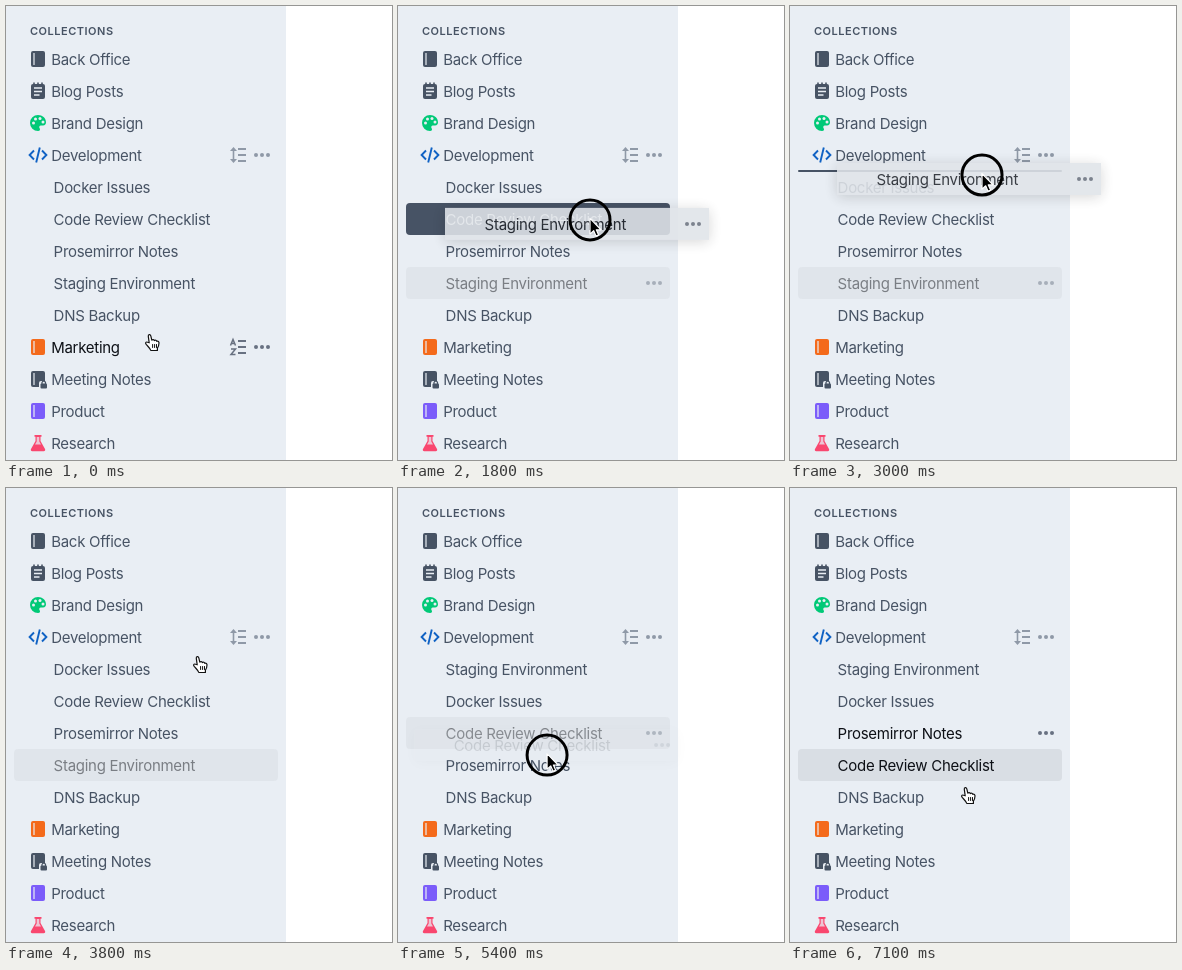
An HTML page that plays this animation: 386 px wide and 454 px high, repeating every 7760 ms.

```html
<!DOCTYPE html>
<html lang="en">
<head>
<meta charset="utf-8">
<title>Sidebar drag and drop</title>
<style>
  html, body { margin: 0; width: 100%; height: 100%; overflow: hidden; background: #fff; }
  svg { display: block; font: 15px Inter, "Open Sans", sans-serif; letter-spacing: -.28px; }
  text { fill: #475364; }
  .title { font-size: 11px; font-weight: 600; letter-spacing: .5px; }
  .ctl { color: #8f99a7; }
  .hover text { fill: #0d1016; }
  .hover .ctl { color: #687181; }
  .row .bg { fill: none; }
  .row .ctl { color: #687181; visibility: hidden; }
  .row.dots .ctl { visibility: visible; }
  .row.focus .bg { fill: #d9dee4; }
  .row.focus text { fill: #0d1016; }
  .row.dim { opacity: .5; }
  .row.drop .bg { fill: #475365; }
  .row.drop text { fill: #fff; }
  #ghost { filter: drop-shadow(0 2px 7px rgba(0, 0, 0, .18)); }
  #ghost .bg { fill: #e0e4e9; rx: 0; }
  #ghost text { fill: #22262d; }
  #ghost .ctl { color: #6b737f; }
</style>
</head>
<body>
<svg id="stage" width="386" height="454" viewBox="0 0 386 454">
  <rect width="280" height="454" fill="#e9eef4"/>
  <text class="title" x="24" y="29">COLLECTIONS</text>
  <g id="list"></g>
  <rect id="line" x="8" width="264" height="2" rx="1" fill="#475365"/>
  <g id="ghost"></g>
  <circle id="ring" fill="none" stroke="#000" stroke-width="3"/>
  <g id="arrow" stroke-linejoin="round">
    <path d="M0 -1.5V14.2L3.7 10.8 6 16.2 8.6 15.1 6.3 9.9H11Z" fill="#000" stroke="#fff" stroke-width="1.2"/>
  </g>
  <g id="hand" stroke="#111" stroke-linejoin="round" stroke-linecap="round">
    <path transform="translate(-6 -2)" fill="#fff" stroke-width="1.2" d="M5.2 9.8 4.3 3.4C4 1.2 6.3 .9 6.8 2.8L7.8 7.2C8.6 6.2 10 6.5 10.4 7.6 11.2 6.8 12.5 7.2 12.8 8.3 14 7.8 15.1 8.6 15 10 14.9 13 14.3 14 13.4 15.2V17.5H6.8C6.4 15.6 4 13.6 2.2 11.4 .8 9.6 2.2 8.5 3.6 9.3Z"/>
    <path transform="translate(-6 -2)" fill="none" stroke-width="1" d="M8.6 11.5v3M10.6 11.5v3M12.5 11.5v3"/>
  </g>
</svg>
<script>
const LOOP = 7760, TOP = 165, ROW = 32;
const INK = '#475364', PAPER = '#e9eef4';
const $ = id => document.getElementById(id);

// Icons are centred on their row.
const book = c => `<rect x="25" y="-8" width="14" height="16" rx="2" fill="${c}"/>
  <path d="M28 -6V6" stroke="${PAPER}" stroke-width="1.2"/>`;
const icons = {
  pad: `<rect x="25" y="-7" width="14" height="15" rx="2" fill="${INK}"/>
    <path d="M28 -8.5v3M32 -8.5v3M36 -8.5v3" stroke="${INK}" stroke-width="1.6"/>
    <path d="M28 -3h8M28 .5h8M28 4h5.5" stroke="${PAPER}" stroke-width="1.5"/>`,
  palette: `<path d="M32 -8a8 8 0 1 0 0 16c2.2 0 2.4-1.8 1.6-2.8-.9-1.2-.2-2.7 1.3-2.7H37c2 0 3-1.4 3-3.2C40 -5 36.4 -8 32 -8Z" fill="#00c977"/>
    <g fill="${PAPER}"><circle cx="27.5" cy="0" r="1.5"/><circle cx="29.5" cy="-4" r="1.5"/>
    <circle cx="34" cy="-4.5" r="1.5"/><circle cx="37" cy="-1" r="1.5"/></g>`,
  code: `<path d="M28 -4.5 23.6 0 28 4.5M36 -4.5 40.4 0 36 4.5M33.8 -7.5 30.2 7.5"
    fill="none" stroke="#1062c4" stroke-width="1.9"/>`,
  lock: book(INK) + `<rect x="33" y="2" width="9" height="8" rx="2" fill="${PAPER}"/>
    <rect x="34.5" y="4.5" width="6.5" height="5" rx="1" fill="${INK}"/>
    <path d="M36 5V3.5a1.8 1.8 0 0 1 3.5 0V5" fill="none" stroke="${INK}" stroke-width="1.2"/>`,
  flask: `<path d="M28.5 -8h7v1.8H34.5V-2L39 6c.6 1.2 0 2.2-1.3 2.2H26.3C25 8.2 24.4 7.2 25 6L29.5 -2V-6.2H28.5Z" fill="#f9476f"/>
    <path d="M30.7 -6V-1.6L29 1.6h6L33.3 -1.6V-6Z" fill="${PAPER}" opacity=".75"/>`
};
const dots = [250, 256, 262].map(x => `<circle cx="${x}" cy="0" r="2"/>`).join('');
const bars = '<path d="M232 -6h8M232 0h8M232 6h8" stroke="currentColor" stroke-width="2"/>';
const arrows = '<path d="M224 -4 227.500 -8 231 -4H228.300V4H231L227.500 8 224 4H226.700V-4Z"/>';
const letters = `<path d="M224.5 -1.5 227 -7.500 229.5 -1.5M225.5 -3.5h3M225 2h4.5L225 7.500h4.5"
  fill="none" stroke="currentColor" stroke-width="1.5"/>`;
const controls = extra => `<g class="ctl" fill="currentColor">${extra}${dots}</g>`;

function move(el, x, y) { el.setAttribute('transform', `translate(${x} ${y})`); }
function group(html, y, cls = '') {
  const g = document.createElementNS('http://www.w3.org/2000/svg', 'g');
  g.setAttribute('class', cls);
  g.innerHTML = html;
  move(g, 0, y);
  $('list').append(g);
  return g;
}

const collection = (name, icon, slot, extra = '') =>
  group(icon + `<text x="45.2" y="6">${name}</text>` + extra, 53 + ROW * slot);
collection('Back Office', book(INK), 0);
collection('Blog Posts', icons.pad, 1);
collection('Brand Design', icons.palette, 2);
const dev = collection('Development', icons.code, 3, controls(arrows + bars));
const marketing = collection('Marketing', book('#f46a1b'), 9);
const marketingCtl = group(controls(letters + bars), 341, 'hover');
collection('Meeting Notes', icons.lock, 10);
collection('Product', book('#7b5cfa'), 11);
collection('Research', icons.flask, 12);

const docBody = name => `<rect class="bg" x="8" y="-16" width="264" height="32" rx="4"/>
  <text x="47.6" y="6">${name}</text>` + controls('');
const names = ['Docker Issues', 'Code Review Checklist', 'Prosemirror Notes', 'Staging Environment', 'DNS Backup'];
const [DOCKER, CODE, PROSE, STAGING, DNS] = names.keys();
const docs = names.map(name => group(docBody(name), 0));

const orders = [
  [0, [DOCKER, CODE, PROSE, STAGING, DNS]],
  [3830, [STAGING, DOCKER, CODE, PROSE, DNS]],
  [6630, [STAGING, DOCKER, PROSE, CODE, DNS]]
];

const drags = [
  { item: STAGING, press: 1000, start: 1070, show: 1130, over: 1400, release: 3000, hand: 3800, done: 3830,
    dx: -153, dy: 4, lineY: 164, onLine: y => y < 172 },
  { item: CODE, press: 5040, start: 5330, show: 5370, over: 5430, release: 6070, hand: 6600, done: 6630,
    dx: -141, dy: -10, lineY: 292, onLine: y => y > 286 }
];

// Pointer path: time, x, y
const path = [
  [0, 144, 329], [30, 144, 329], [470, 168, 287], [670, 168, 287], [960, 181, 274], [1050, 181, 274],
  [1430, 192, 271], [1470, 192, 270], [1800, 192, 214], [2230, 192, 179], [2370, 192, 177],
  [2730, 192, 169], [4470, 192, 169], [5040, 141, 255], [5330, 141, 255], [5400, 149, 267],
  [5870, 176, 300], [LOOP, 176, 300]
];

const clamp = v => Math.max(0, Math.min(1, v));
const ramp = (t, from, len) => clamp((t - from) / len);

// Monotone cubic through the path points
function along(t, axis) {
  const slope = i => path[i + 1] && path[i]
    ? (path[i + 1][axis] - path[i][axis]) / (path[i + 1][0] - path[i][0]) : 0;
  const tangent = i => {
    const a = slope(i - 1), b = slope(i);
    return a * b <= 0 ? 0 : 2 * a * b / (a + b);
  };
  let i = 0;
  while (i < path.length - 2 && t >= path[i + 1][0]) i++;
  const span = path[i + 1][0] - path[i][0], u = (t - path[i][0]) / span;
  const s = u * u * (3 - 2 * u);
  return path[i][axis] * (1 - s) + path[i + 1][axis] * s
    + span * u * (1 - u) * (tangent(i) * (1 - u) - tangent(i + 1) * u);
}

const rowAt = (order, y) => order[Math.floor((y - TOP) / ROW)];

function hovered(t, order, y) {
  if (t >= 6630) return PROSE;
  if (t >= 3830 && t < 4500) return 'dev';
  return y >= 325 ? 'marketing' : rowAt(order, y);
}

let ghostItem = -1;
function draw(t) {
  const x = along(t, 1), y = along(t, 2);
  const order = orders.filter(o => t >= o[0]).pop()[1];
  const drag = drags.find(d => t >= d.start && t < d.done);
  const held = drag && t < drag.release + 60;
  const hover = drag ? null : hovered(t, order, y);
  const focus = t >= drags[1].press ? CODE : t >= drags[0].press ? STAGING : -1;
  const onLine = held && drag.onLine(y);
  const target = held && !onLine && t >= drag.over ? rowAt(order, y) : -1;

  dev.classList.toggle('hover', hover === 'dev');
  marketing.classList.toggle('hover', hover === 'marketing');
  marketingCtl.style.display = hover === 'marketing' ? '' : 'none';

  docs.forEach((el, i) => {
    const dragged = drag && drag.item === i;
    const flags = {
      hover: hover === i && (t < 6630 || t >= 7070),
      dots: hover === i || dragged && held,
      focus: focus === i,
      dim: dragged,
      drop: target === i && !dragged
    };
    el.setAttribute('class', 'row ' + Object.keys(flags).filter(k => flags[k]).join(' '));
    move(el, 0, TOP + ROW * (order.indexOf(i) + .5));
  });

  $('line').style.opacity = onLine ? 1 : drag && t >= drag.release ? 1 - ramp(t, drag.release + 60, 150) : 0;
  if (drag) $('line').setAttribute('y', drag.lineY);

  const ghost = $('ghost');
  ghost.style.opacity = held ? .88 * ramp(t, drag.show, 200) : 0;
  if (held) {
    if (ghostItem !== drag.item) ghost.innerHTML = docBody(names[ghostItem = drag.item]);
    move(ghost, x + drag.dx, y + drag.dy);
  }

  const press = drags.find(d => t >= d.press && t < d.release + 230);
  const ring = $('ring');
  ring.style.opacity = press ? ramp(t, press.press, 25) * (1 - ramp(t, press.release, 230)) : 0;
  if (press) {
    const grow = 1 - ramp(t, press.press + 40, 160) + ramp(t, press.release, 230);
    ring.setAttribute('r', 20 + 8.5 * grow);
    ring.setAttribute('cx', x);
    ring.setAttribute('cy', y);
  }

  const arrow = drag && t < drag.hand;
  $('arrow').style.display = arrow ? '' : 'none';
  $('hand').style.display = arrow ? 'none' : '';
  move($('arrow'), x, y);
  move($('hand'), x, y);
}

const begin = performance.now();
(function tick() {
  draw((performance.now() - begin) % LOOP);
  requestAnimationFrame(tick);
})();
</script>
</body>
</html>
```
